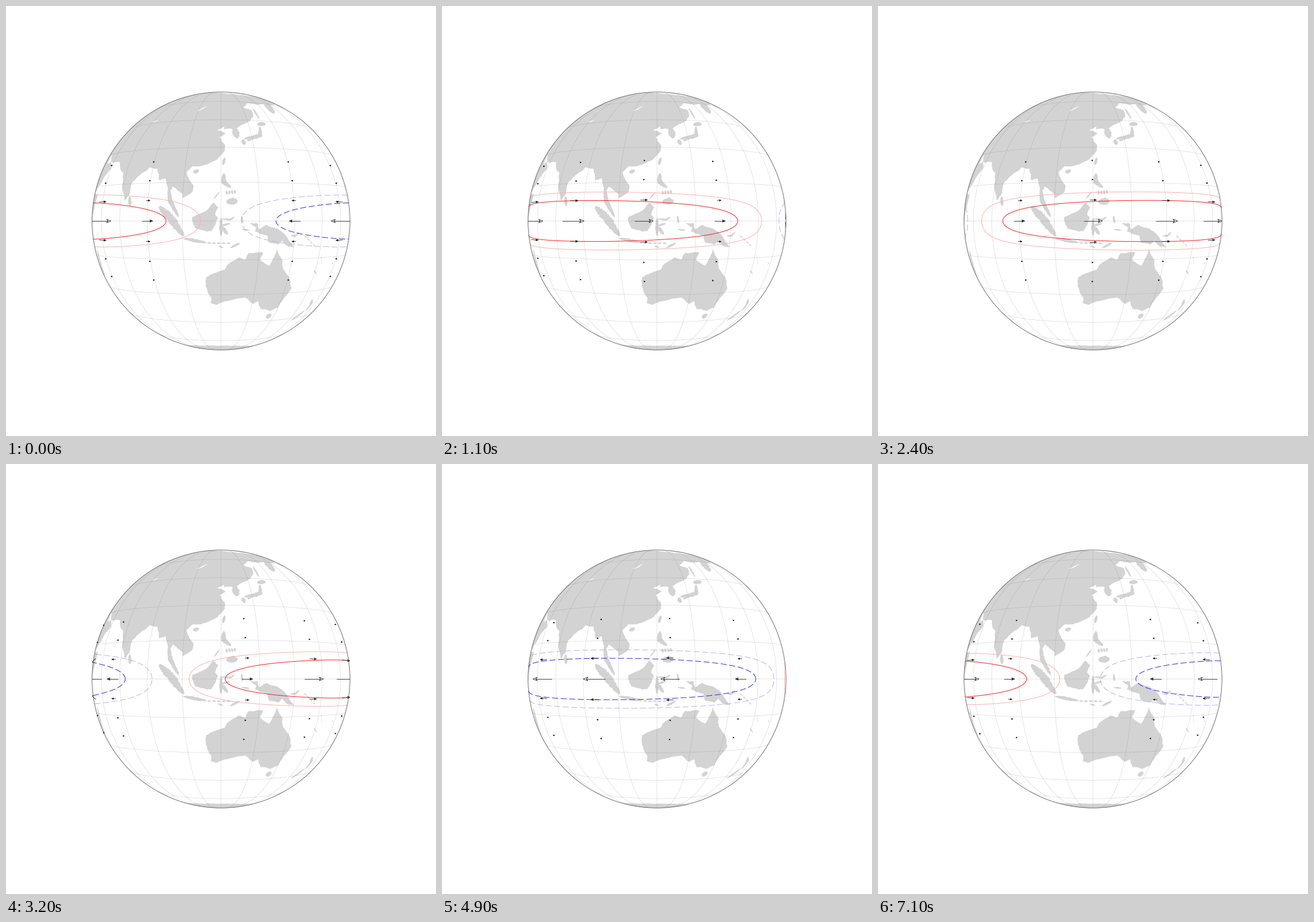
A matplotlib script for the animation above (7.2 s loop, 748 by 748 pixels).

```python
import numpy as np
import matplotlib.pyplot as plt
from matplotlib.animation import FuncAnimation
from matplotlib.collections import LineCollection, PolyCollection
from matplotlib.patches import Circle, Polygon

SIZE, DPI = 748, 100
PT = 72 / DPI            # points per pixel
R = 224.4                # globe radius in pixels
P = 6.61                 # viewer distance in globe radii
LON0 = 120
FRAMES = 72
STEP = 360 / FRAMES      # eastward drift per frame, degrees
TRAP = 8                 # equatorial trapping scale, degrees
ARROW = 38               # longest arrow in pixels
INK = "#1c1c1c"
GREY = "#d3d3d3"

rng = np.random.default_rng(4)
fig = plt.figure(figsize=(SIZE / DPI, SIZE / DPI), dpi=DPI, facecolor="white")
ax = fig.add_axes([0.2, 0.2, 0.6, 0.6])
ax.set_xlim(-R, R)
ax.set_ylim(-R, R)
ax.axis("off")
disc = Circle((0, 0), R, fc="none", ec="#555555", lw=0.75 * PT, zorder=6,
              clip_on=False)
ax.add_patch(disc)


def project(lon, lat):
    """Geostationary view; lon is relative to the centre. Returns x, y, visible."""
    lon, lat = np.radians(lon), np.radians(lat)
    east, up = np.cos(lat) * np.sin(lon), np.sin(lat)
    toward = np.cos(lat) * np.cos(lon)
    k = R / np.arcsin(1 / P)
    x = k * np.arctan(east / (P - toward))
    y = k * np.arctan(up / np.hypot(east, P - toward))
    return x, y, toward >= 1 / P


def visible_line(lon, lat):
    x, y, seen = project(lon, lat)
    return np.where(seen, x, np.nan), np.where(seen, y, np.nan)


def fill(lon, lat, color=GREY):
    """Fill an outline; points behind the globe are pushed past the limb."""
    x, y, seen = project(lon - LON0, lat)
    a, b = np.radians(lon - LON0), np.radians(lat)
    angle = np.arctan2(np.sin(b), np.cos(b) * np.sin(a))
    x = np.where(seen, x, 1.1 * R * np.cos(angle))
    y = np.where(seen, y, 1.1 * R * np.sin(angle))
    shape = Polygon(np.c_[x, y], fc=color, ec="none", zorder=1)
    ax.add_patch(shape)
    shape.set_clip_path(disc)


def coast(*coords):
    """Land through lon, lat key points, roughened by midpoint displacement."""
    pts = np.reshape(coords, (-1, 2)).astype(float)
    for _ in range(3):
        ahead = np.roll(pts, -1, axis=0)
        normal = (ahead - pts)[:, ::-1] * [-1, 1]
        shift = rng.uniform(-0.08, 0.08, (len(pts), 1))
        pts = np.stack([pts, (pts + ahead) / 2 + shift * normal],
                       axis=1).reshape(-1, 2)
    fill(*pts.T)


def ribbon(width, *coords, color=GREY):
    """Long island or peninsula of a given width along a spine."""
    spine = np.reshape(coords, (-1, 2))
    t = np.linspace(0, 1, 25)
    knots = np.linspace(0, 1, len(spine))
    lon, lat = (np.interp(t, knots, c) for c in spine.T)
    shrink = np.cos(np.radians(lat))
    dx, dy = np.gradient(lon) * shrink, np.gradient(lat)
    half = width / 2 * np.sqrt(np.abs(np.sin(np.pi * t)))
    left, right = half * rng.uniform(0.8, 1.2, (2, len(t)))
    nx, ny = -dy / np.hypot(dx, dy) / shrink, dx / np.hypot(dx, dy)
    fill(np.r_[lon + left * nx, (lon - right * nx)[::-1]],
         np.r_[lat + left * ny, (lat - right * ny)[::-1]], color)


def chain(count, width, lon1, lat1, lon2, lat2):
    """Row of small islands between two places."""
    lons, lats = np.linspace(lon1, lon2, count + 1), np.linspace(lat1, lat2, count + 1)
    for i in range(count):
        ribbon(width, lons[i], lats[i], 0.2 * lons[i] + 0.8 * lons[i + 1],
               0.2 * lats[i] + 0.8 * lats[i + 1])


# Eurasia and its peninsulas
coast(30, 30, 28, 50, 45, 68, 70, 72, 104, 77.5, 128, 72, 160, 70, 190, 66,
      178, 62, 163, 60, 155, 59, 142, 59, 136, 54.5, 141, 52.5, 139.5, 47.5,
      133, 42.8, 129.5, 41, 127.5, 39.6, 125, 39.6, 121.5, 39.2, 121.7, 40.8,
      118, 38.7, 122.3, 37, 119.3, 35, 121.9, 31, 121.7, 28.5, 118.5, 24.5,
      114, 22.3, 108.3, 21.6, 105.8, 19, 109.2, 13.5, 108.8, 11.2, 105, 8.7,
      105, 10.3, 102.3, 12.3, 100.5, 13.4, 99, 11, 98.5, 13, 97, 16.8,
      94.3, 16, 92.3, 21, 88, 21.7, 86.5, 20, 80.2, 15.5, 79.8, 10.5,
      77.5, 8.1, 74.8, 13, 72.8, 20, 69, 22.3, 67, 25, 57, 25.7, 50, 30)
ribbon(4, 164, 62, 159, 56, 156.8, 51)
ribbon(2.7, 127, 40.3, 127.6, 34.4)
ribbon(1.8, 98.8, 13, 100, 7.5, 103.7, 1.4)
# Arabia and Africa
coast(50, 30, 51, 25, 56, 26, 59.8, 22.5, 52, 15.7, 43, 12.5, 30, 15, 30, 28)
coast(35, 13, 51.2, 11.8, 48, 5, 41, -2, 39, -8, 40, -15, 30, -25, 25, 0)
ribbon(3.8, 49.5, -12.3, 45.5, -25.3)
# islands off south and east Asia
ribbon(1.8, 80, 9.8, 81, 5.9)
ribbon(1.5, 108.6, 19, 111, 19.8)
ribbon(1.1, 121.6, 25.3, 120.8, 22)
ribbon(1.7, 130.2, 33.9, 130.8, 31.2)
ribbon(0.9, 132.3, 33.2, 134.6, 34.1)
ribbon(1.9, 130.9, 34.2, 136, 35.2, 139.5, 36.3, 141.2, 41.4)
ribbon(2.4, 140, 42.1, 145.4, 43.7)
ribbon(0.9, 142.7, 46, 142.7, 54.3)
# Philippines
ribbon(1.8, 121.2, 18.7, 121, 15, 124, 12.7)
ribbon(2.6, 122, 7.3, 126.4, 7.6)
chain(4, 1.5, 121.8, 10.8, 126, 11.2)
ribbon(0.5, 117.2, 8.4, 119.5, 11.2)
# Borneo, Sumatra, Java, Sulawesi
coast(109, 1.5, 111.2, 2.4, 113.5, 3.4, 117, 7, 119, 5.2, 117.7, 2.5,
      118.8, 1, 116.3, -3.8, 114.5, -4, 110.2, -2.8, 109, 0)
ribbon(3.2, 95.2, 5.7, 100.5, 0.9, 105.8, -5.9)
ribbon(1.3, 105.2, -6.6, 114.5, -8.3)
ribbon(0.7, 125.1, 1.6, 123.5, 0.5, 120, 0.8)
ribbon(1.2, 120, 1.2, 120, -5.7)
ribbon(0.8, 120.2, -1.8, 123.4, -0.9)
ribbon(1.4, 120.3, -2, 122.5, -5.2)
# Lesser Sundas and Moluccas
chain(5, 0.6, 114.7, -8.4, 124, -8.5)
ribbon(0.9, 123.5, -10.3, 127.3, -8.4)
ribbon(0.6, 119, -9.5, 120.8, -10.2)
ribbon(0.8, 127.8, 2, 128.2, -0.9)
ribbon(0.6, 127.9, -3.2, 130.9, -3.5)
# New Guinea and the south-west Pacific
coast(131, -0.8, 134, -0.8, 134.7, -3.2, 137.8, -1.5, 141, -2.6, 145.7, -5.3,
      147, -6.8, 150.8, -10.4, 147.5, -10, 144.5, -7.6, 143, -9.1,
      138.8, -8.2, 138.2, -5.6, 133, -4, 133.5, -2.4)
ribbon(0.8, 148.3, -5.8, 150.5, -5.8, 152.3, -4.3)
chain(4, 0.45, 154.8, -5.7, 162, -10.4)
chain(3, 0.35, 166.7, -14.8, 168.5, -18)
ribbon(0.5, 164, -20.2, 167, -22.3)
ribbon(0.6, 177.3, -18.1, 178.7, -17.7)
# Australia, Tasmania, New Zealand
coast(113.8, -22.3, 116.8, -20.6, 121.5, -19, 122.3, -17.2, 124.5, -15.5,
      127, -14, 129.6, -14.9, 131, -12.3, 136.8, -12.2, 135.7, -15,
      140, -17.6, 141.6, -14, 142.5, -10.8, 145.3, -15, 146.3, -18.9,
      150.8, -23.3, 153.5, -28, 150, -37.4, 146.4, -39, 140.3, -37.8,
      137.9, -33.5, 135.7, -34.8, 131.2, -31.5, 126, -32.3, 120, -33.9,
      117.8, -35, 115.1, -34.2, 115.6, -31.5, 113.5, -26)
ribbon(2.4, 146.5, -40.5, 147, -43.6)
ribbon(2, 172.8, -34.5, 175.7, -37.5, 175.3, -41.5)
ribbon(2, 173.8, -40.8, 171, -43.5, 167.3, -46.5)
ribbon(0.5, 68.9, -48.9, 70.3, -49.3)
# Antarctica: a shore that recedes on both sides
shore = np.linspace(60, 175, 60)
fill(np.r_[shore, 170, 120, 70],
     np.r_[-66.4 - 0.0016 * (shore - 115) ** 2 - rng.uniform(0, 0.8, 60),
           -84, -86, -84])
# Lakes Baikal and Balkhash
ribbon(0.6, 104, 51.6, 107, 53, 109.8, 55.6, color="white")
ribbon(0.6, 74, 45.8, 79, 46.6, color="white")

# graticule every 15 degrees
span = np.linspace(-90, 90, 361)
grid_style = dict(color="#808080", alpha=0.32, lw=0.65 * PT, zorder=2,
                  snap=False)
for deg in range(-75, 76, 15):
    ax.plot(*visible_line(np.full_like(span, deg), span), **grid_style)
    ax.plot(*visible_line(span, np.full_like(span, deg)), **grid_style)


def contour(peak, level):
    """Outline of exp(-(lat/TRAP)^2) cos(lon - peak) = level."""
    theta = np.linspace(0, 2 * np.pi, 721)
    d = np.arccos(level) * np.cos(theta)
    lat = TRAP * np.sqrt(np.maximum(np.log(np.cos(d) / level), 0))
    return visible_line(peak + np.degrees(d), lat * np.sign(np.sin(theta)))


# (offset of the crest, level, line)
contours = []
for offset, strong, pale, dash in ((0, "#ff1414", "#ffacac", "-"),
                                   (180, "#1e1ef5", "#b0b0f8", (0, (11, 4.7)))):
    for level, color in ((np.exp(-2), pale), (np.exp(-1), strong)):
        line, = ax.plot([], [], color=color, ls=dash, lw=0.95 * PT, zorder=3,
                        dash_capstyle="butt")
        contours.append((offset, level, line))

shafts = LineCollection([], colors=INK, linewidths=0.8 * PT, zorder=4)
heads = PolyCollection([], edgecolors=INK, linewidths=0.8 * PT, zorder=5)
ax.add_collection(shafts)
ax.add_collection(heads)

# arrow phases skip the nodes, where there is no wind
PHASES = [p for p in range(0, 360, 30) if p % 180 != 90]
ROWS = range(-24, 25, 8)


def arrow(lon, lat, speed):
    """Shaft, head and head colour of one wind arrow, or None when hidden."""
    x, y, seen = project(lon, lat)
    if not seen:
        return None
    east, west = project(lon + 0.1, lat), project(lon - 0.1, lat)
    u = np.array([east[0] - west[0], east[1] - west[1]])
    u *= np.sign(speed) / np.hypot(*u)
    v = np.array([-u[1], u[0]])
    length = abs(speed) * ARROW
    size = 2.2 + 0.16 * length
    tip = np.array([x, y]) + u * length / 2
    back = tip - u * size
    notch = back + 0.35 * size * u
    head = [tip, back + 0.4 * size * v, notch, back - 0.4 * size * v]
    tail = tip - u * max(length, 0.65 * size)
    return [tail, notch], head, "white" if length > 25 else INK


def update(frame):
    peak = frame * STEP - 90
    for offset, level, line in contours:
        line.set_data(*contour(peak + offset, level))
    arrows = []
    for phase in PHASES:
        for lat in ROWS:
            speed = np.cos(np.radians(phase)) * np.exp(-(lat / TRAP) ** 2)
            arrows.append(arrow(peak + phase, lat, speed))
    lines, tips, fills = zip(*[a for a in arrows if a])
    shafts.set_segments(lines)
    heads.set_verts(tips)
    heads.set_facecolors(fills)
    return [line for _, _, line in contours] + [shafts, heads]


anim = FuncAnimation(fig, update, frames=FRAMES, interval=100, repeat=True,
                     repeat_delay=0, blit=False)
plt.show()
```
